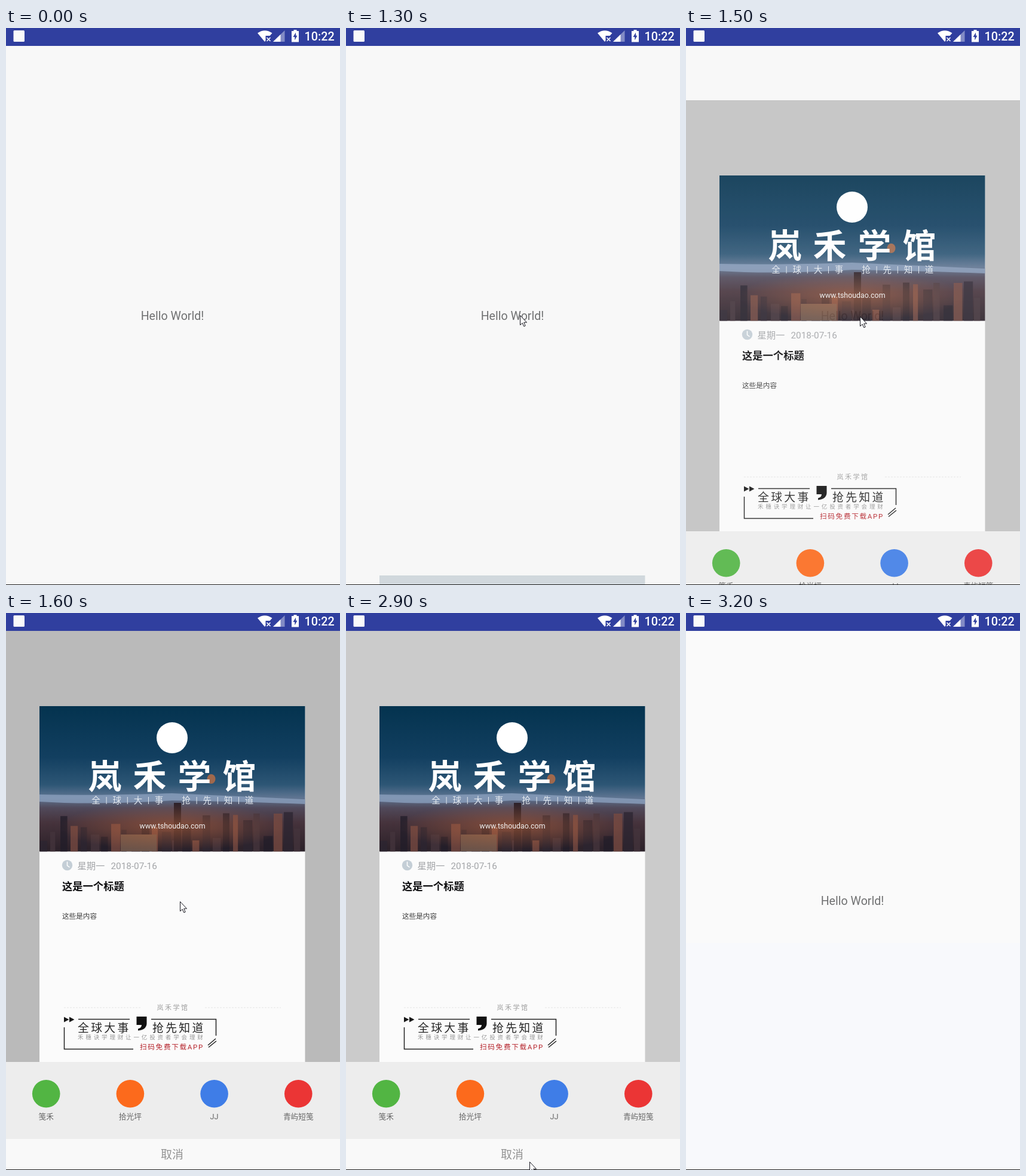
Animation of 559 by 933 pixels, one loop 4400 ms. Source, as an HTML page:

```html
<!DOCTYPE html>
<html lang="zh-CN">
<head>
<meta charset="utf-8">
<title>Share sheet</title>
<style>
html, body { margin: 0; width: 100%; height: 100%; overflow: hidden; background: #f8f8f8; }
svg { display: block; width: 559px; height: 933px; }
text { font-family: Roboto, "Noto Sans CJK SC", "Noto Sans CJK", sans-serif; white-space: pre; }
.mid { text-anchor: middle; }
</style>
</head>
<body>
<svg viewBox="0 0 559 933">
  <defs>
    <linearGradient id="sky" x1="0" y1="0" x2="0" y2="1">
      <stop offset="0" stop-color="#04334f"/>
      <stop offset=".35" stop-color="#123f60"/>
      <stop offset=".54" stop-color="#2d5675"/>
      <stop offset=".63" stop-color="#5f7592"/>
      <stop offset=".7" stop-color="#50495a"/>
      <stop offset=".8" stop-color="#46333c"/>
      <stop offset="1" stop-color="#2a2028"/>
    </linearGradient>
    <radialGradient id="glow">
      <stop offset="0" stop-color="#e8793c" stop-opacity=".4"/>
      <stop offset="1" stop-color="#e8793c" stop-opacity="0"/>
    </radialGradient>
  </defs>

  <rect id="page" width="559" height="933" fill="#f8f8f8"/>
  <rect id="tint" y="553" width="559" height="380" fill="#f8f9fc"/>
  <text class="mid" x="278.5" y="489" font-size="19.6" fill="#707172">Hello World!</text>

  <g id="sheet">
    <rect id="dim" y="30" width="559" height="903"/>
    <rect x="56" y="156" width="444.5" height="596" fill="#fbfbfb"/>
    <rect x="56" y="156" width="444.5" height="243.5" fill="url(#sky)"/>
    <path d="M56 304Q150 306 278 302Q410 308 500.5 312V320Q400 316 278 314Q150 322 56 316Z" fill="#8a9fbd" opacity=".8"/>
    <g id="city"></g>
    <ellipse cx="278" cy="358" rx="190" ry="41" fill="url(#glow)"/>
    <ellipse cx="343.5" cy="278" rx="7" ry="8" fill="#a0684c"/>
    <circle cx="278" cy="209" r="26" fill="#fff"/>
    <g id="brand" class="mid" font-size="56" font-weight="900" fill="#fff"></g>
    <g id="motto" class="mid" font-size="14.5" fill="#e4e9ef"></g>
    <text class="mid" x="278.5" y="361" font-size="12.4" fill="#f2f2f2">www.tshoudao.com</text>

    <circle cx="102.5" cy="422.5" r="8.7" fill="#c4ced6"/>
    <path d="M102.5 416.5V423L106.5 426" fill="none" stroke="#fff" stroke-width="1.5"/>
    <g font-size="15.3" fill="#a3a5a8">
      <text x="119.5" y="428.5">星期一</text>
      <text x="175.5" y="428.5">2018-07-16</text>
    </g>
    <text x="94" y="464" font-size="17.3" font-weight="700" fill="#0c0c0e">这是一个标题</text>
    <text x="94" y="512" font-size="11.6" fill="#3c3c3c">这些是内容</text>

    <path d="M97 661H226M333 661H460" stroke="#e4e4e4" stroke-dasharray="3 2"/>
    <text x="252.5" y="665" font-size="11" letter-spacing="2.5" fill="#9d9d9d">岚禾学馆</text>
    <path d="M97 676.5L105.5 681L97 685.5ZM106 676.5L114.5 681L106 685.5Z" fill="#171717"/>
    <path d="M121 680.5H207M243 680.5H351.5V708M97.5 694V730.5H213M338 724L351 713M339 727.5L352 717"
      fill="none" stroke="#222" stroke-width="1.5"/>
    <path d="M218.5 676H235.5V688Q235 698 221 699.5V696.5Q227 695 227 690H218.5Z" fill="#111"/>
    <g font-size="18.8" letter-spacing="3.4" fill="#252525">
      <text x="120" y="702">全球大事</text>
      <text x="245" y="702">抢先知道</text>
    </g>
    <text x="120" y="713.5" font-size="9.5" letter-spacing="3.85" fill="#969696">禾穗诀学理财让一亿投资者学会理财</text>
    <text x="224" y="731" font-size="11.6" letter-spacing="1.7" fill="#b5232b">扫码免费下载APP</text>

    <rect y="752" width="559" height="129" fill="#ededed"/>
    <rect y="881" width="559" height="52" fill="#f9f9f9"/>
    <g id="apps" class="mid" font-size="12.7"></g>
    <text class="mid" x="278" y="914" font-size="19" fill="#929292">取消</text>
  </g>

  <rect width="559" height="30" fill="#303f9f"/>
  <g fill="#fff">
    <rect x="12.5" y="4" width="18.5" height="19" rx="1.5" fill="#fafafa"/>
    <path d="M433 23L421 8.5Q433 0 445.5 8.5L441.5 13H434.5V21.2Z"/>
    <path d="M436.5 16L442.5 22M442.5 16L436.5 22" stroke="#fff" stroke-width="1.6"/>
    <path d="M447 23L466.5 4V23Z" opacity=".4"/>
    <path d="M447 23L459.5 10.8V23Z"/>
    <path d="M478 5H481.5V3H486.5V5H490V23.5H478Z"/>
    <path d="M485 7.5L480.5 15H483.3V20.5L487.5 12.8H485Z" fill="#303f9f"/>
    <text x="499.5" y="21" font-size="19.8" font-weight="500">10:22</text>
  </g>
  <rect y="932" width="559" height="1" fill="#1c1c1c"/>
  <path id="cursor" d="M.5 .5V16.5L4.2 13.2L6.8 18.8L9.2 17.8L6.7 12.2H11.5Z"
    fill="#fff" stroke="#15151d" stroke-linejoin="round"/>
</svg>
<script>
const LOOP = 4400, TICK = 100;
const el = id => document.getElementById(id);
const set = (id, attrs) => {
  for (const key in attrs) el(id).setAttribute(key, attrs[key]);
};
const clamp = v => Math.max(0, Math.min(1, v));
const decelerate = v => 1 - (1 - clamp(v)) ** 2;

// Static parts that repeat
const label = (s, x, y, extra = '') => `<text x="${x}" y="${y}" ${extra}>${s}</text>`;

el('brand').innerHTML = [...'岚禾学馆'].map((c, i) => label(c, 165.5 + 75 * i, 294)).join('');

const row = (chars, x) => [...chars].map((c, i) =>
  label(c, x + 35.2 * i, 319) +
  (i < 3 ? `<path d="M${x + 17.6 + 35.2 * i} 308V320" stroke="#dfe5ec"/>` : '')).join('');
el('motto').innerHTML = row('全球大事', 150.5) + row('抢先知道', 301.5);

el('apps').innerHTML = [
  ['笺禾', '#52b543'], ['拾光坪', '#fc6a1c'], ['JJ', '#3f7de7'], ['青屿短笺', '#eb3535']
].map(([name, color], i) => {
  const x = 67.2 + 140.7 * i;
  return `<circle cx="${x}" cy="805.3" r="23.3" fill="${color}"/>` +
    label(name, x, 848, 'fill="#666"');
}).join('');

let seed = 11;
const random = () => (seed = seed * 16807 % 2147483647) / 2147483647;
const tones = ['#2b2531', '#44343d', '#201d28', '#7a4b42'];
el('city').innerHTML = Array.from({ length: 26 }, (_, i) => {
  const h = 18 + random() * 48, x = 57 + i * 17, w = 8 + random() * 9;
  return `<rect x="${x}" y="${399.5 - h}" width="${w}" height="${h}" fill="${tones[i % 4]}" opacity=".75"/>`;
}).join('') + '<rect x="281" y="318" width="12" height="81" fill="#2a2029"/>' +
  '<rect x="192" y="371" width="60" height="28" fill="#6b5349"/>';

// Pointer keys: time, x, y
const path = [
  [100, 553, 88], [400, 342, 402], [500, 283, 452], [600, 292, 477], [700, 292, 478],
  [1100, 292, 478], [1400, 291, 482], [1600, 291, 483], [1700, 292, 520], [1800, 296, 640],
  [1900, 302, 780], [2000, 307, 880], [2100, 308, 919], [2400, 308, 919], [2500, 307, 919],
  [2900, 307, 919], [3000, 308, 927]
];

function pointer(t) {
  const next = path.findIndex(p => p[0] >= t);
  if (next < 0 || t < path[0][0]) return null;
  const b = path[next], a = path[Math.max(0, next - 1)];
  const k = b === a ? 0 : (t - a[0]) / (b[0] - a[0]);
  return [1, 2].map(i => Math.round(a[i] + (b[i] - a[i]) * k));
}

function draw(time) {
  const t = Math.floor(time % LOOP / TICK) * TICK;
  const shown = decelerate((t - 1272.7) / 333) * (1 - decelerate((t - 2900) / 300));
  const fade = clamp((t - 2700) / 770);
  set('sheet', {
    transform: `translate(0 ${Math.round(903 * (1 - shown))})`,
    opacity: shown,
    visibility: shown > 0 ? 'visible' : 'hidden'
  });
  set('dim', { opacity: 0.246 * shown * (1 - fade) });

  const rested = t >= 3200;
  set('page', { fill: rested ? '#fafafa' : '#f8f8f8' });
  set('tint', { visibility: rested ? 'visible' : 'hidden' });

  const at = pointer(t);
  set('cursor', {
    visibility: at ? 'visible' : 'hidden',
    transform: `translate(${at || '0 0'})`
  });
}

const start = performance.now();
function loop() {
  draw(performance.now() - start);
  requestAnimationFrame(loop);
}
loop();
</script>
</body>
</html>
```
